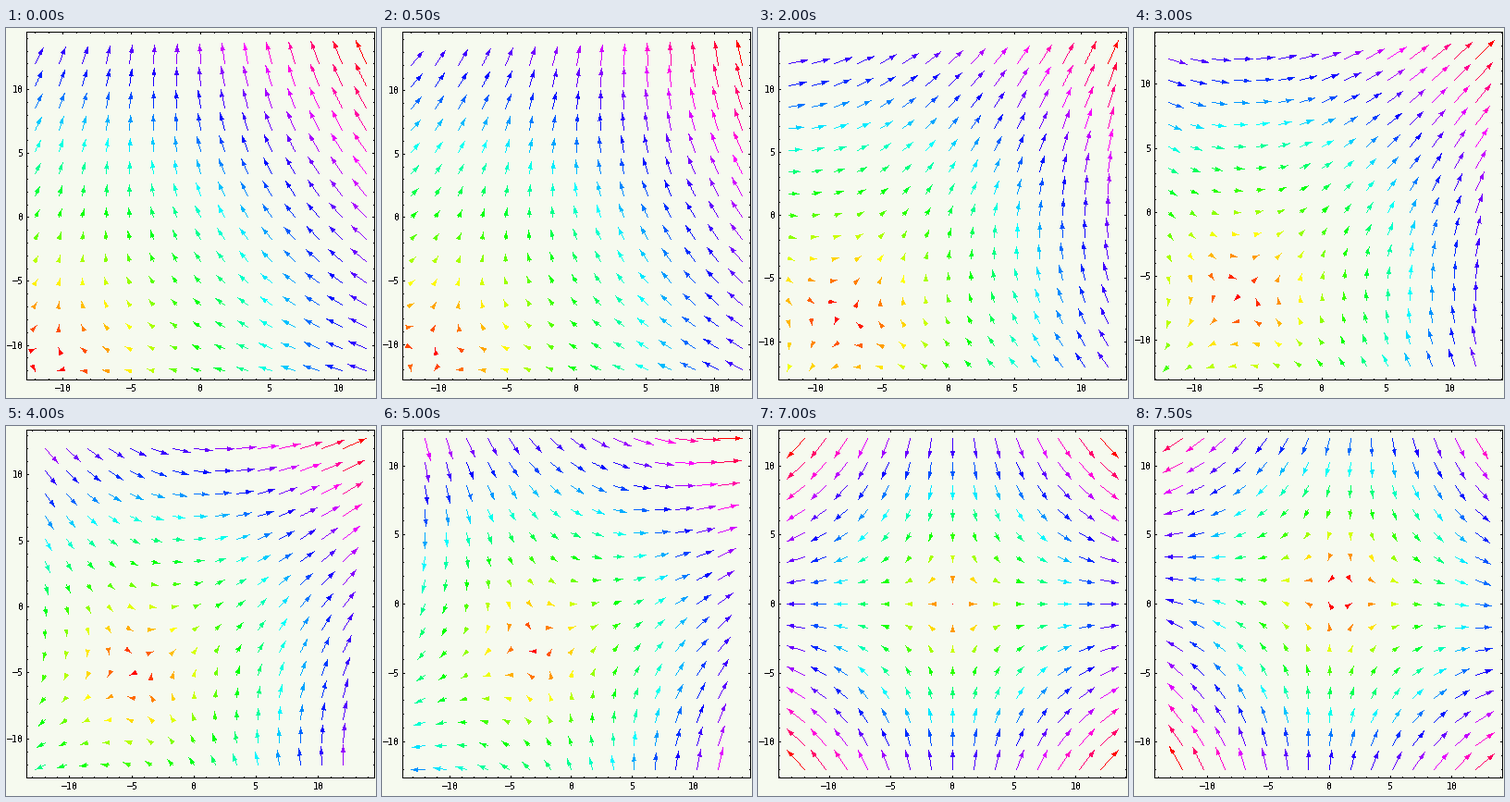
Write a matplotlib script that moves like this. It is 400 px wide and 400 px high and loops after 8 s.

```python
import numpy as np
import matplotlib.pyplot as plt
from matplotlib.animation import FuncAnimation
from matplotlib.colors import hsv_to_rgb, to_rgb

SIZE, DPI = 400, 100
FRAMES, INTERVAL = 16, 500
BACK = to_rgb("#f6faef")
LEFT, TOP, SIDE = 22, 4, 376       # plot frame, in pixels
RIGHT, BOTTOM = LEFT + SIDE, TOP + SIDE
HALF, N = 12, 15
MAX_LEN = 2.0                      # longest arrow, in plot units
HEAD_LEN, HEAD_HALF = 7.8, 2.6     # arrow head, in pixels
PAD = 0.025
MAJOR = range(-10, 11, 5)

plt.rcParams["text.antialiased"] = False

fig = plt.figure(figsize=(SIZE / DPI, SIZE / DPI), dpi=DPI, facecolor=BACK)
ax = fig.add_axes([0, 0, 1, 1])
ax.axis("off")
image = ax.imshow(np.ones((SIZE, SIZE, 3)), extent=(0, SIZE, SIZE, 0),
                  interpolation="nearest", aspect="auto")

font = dict(family="DejaVu Sans Mono", fontsize=10 * 72 / DPI, color="black")


def label(v, **align):
    return ax.text(0, 0, str(v).replace("-", "\u2212"), va="baseline", **font, **align)


x_labels = [label(v, ha="center") for v in MAJOR]
y_labels = [label(v, ha="right") for v in MAJOR]

axis = np.linspace(-HALF, HALF, N)
gx, gy = np.meshgrid(axis, axis)
grid = (gx + 1j * gy).ravel()


def field(k):
    """Saddle whose centre slides along the diagonal while it turns."""
    centre = 0.8 * (k - 14) * (1 + 1j)
    turn = np.exp(1j * np.pi * (14 - k) / 16)
    return turn * np.conj(grid - centre)


def padded(values):
    lo, hi = values.min(), values.max()
    pad = PAD * (hi - lo)
    return lo - pad, hi + pad


def whole(span):
    return range(int(np.ceil(span[0])), int(np.floor(span[1])) + 1)


def draw_shafts(canvas, tail, tip, colors):
    """One-pixel lines, stepped along the longer direction."""
    start = np.rint(tail)
    delta = np.rint(tip) - start
    count = np.maximum(np.abs(delta).max(axis=1), 1)
    steps = np.arange(count.max() + 1)
    t = np.minimum(steps / count[:, None], 1)
    pts = np.rint(start[:, None] + delta[:, None] * t[..., None]).astype(int)
    canvas[pts[..., 1], pts[..., 0]] = colors[:, None]


def draw_heads(canvas, tip, along, colors):
    """Fill every pixel whose centre lies in the head's triangle."""
    reach = np.arange(-10, 11)
    dx, dy = np.meshgrid(reach, reach)
    near = np.rint(tip)[:, None] + np.column_stack([dx.ravel(), dy.ravel()])
    off = tip[:, None] - near
    back = (off * along[:, None]).sum(axis=2)
    across = np.abs(off[..., 0] * along[:, None, 1] - off[..., 1] * along[:, None, 0])
    inside = (back >= 0) & (back <= HEAD_LEN) & (across <= back * HEAD_HALF / HEAD_LEN)
    arrow, spot = np.nonzero(inside)
    x, y = near[arrow, spot].astype(int).T
    canvas[y, x] = colors[arrow]


def draw_frame(canvas, xs, ys, px, py):
    canvas[[TOP, BOTTOM], LEFT:RIGHT + 1] = 0
    canvas[TOP:BOTTOM + 1, [LEFT, RIGHT]] = 0
    for v in whole(xs):
        size, x = (2 if v % 5 == 0 else 1), round(px(v))
        canvas[TOP:TOP + size + 1, x] = 0
        canvas[BOTTOM - size:BOTTOM + 1, x] = 0
    for v in whole(ys):
        size, y = (2 if v % 5 == 0 else 1), round(py(v))
        canvas[y, LEFT:LEFT + size + 1] = 0
        canvas[y, RIGHT - size:RIGHT + 1] = 0


def update(k):
    v = field(k)
    mag = np.abs(v)
    tips = grid + v * MAX_LEN / mag.max()
    ends = np.concatenate([grid, tips])
    xs, ys = padded(ends.real), padded(ends.imag)

    def px(x):
        return LEFT + (x - xs[0]) / (xs[1] - xs[0]) * SIDE

    def py(y):
        return BOTTOM - (y - ys[0]) / (ys[1] - ys[0]) * SIDE

    tail = np.column_stack([px(grid.real), py(grid.imag)])
    tip = np.column_stack([px(tips.real), py(tips.imag)])
    along = tip - tail
    along /= np.hypot(along[:, 0], along[:, 1])[:, None]

    hue = (mag - mag.min()) / (mag.max() - mag.min())
    full = np.ones_like(hue)
    colors = hsv_to_rgb(np.column_stack([hue, full, full]))

    canvas = np.full((SIZE, SIZE, 3), BACK)
    draw_shafts(canvas, tail, tip, colors)
    draw_heads(canvas, tip, along, colors)
    draw_frame(canvas, xs, ys, px, py)
    image.set_data(canvas)

    for value, tx, ty in zip(MAJOR, x_labels, y_labels):
        tx.set_position((px(value) + 0.5, 393))
        ty.set_position((19, py(value) + 4))
    return [image, *x_labels, *y_labels]


anim = FuncAnimation(fig, update, frames=FRAMES, interval=INTERVAL,
                     repeat=True, repeat_delay=0, blit=False)
plt.show()
```
